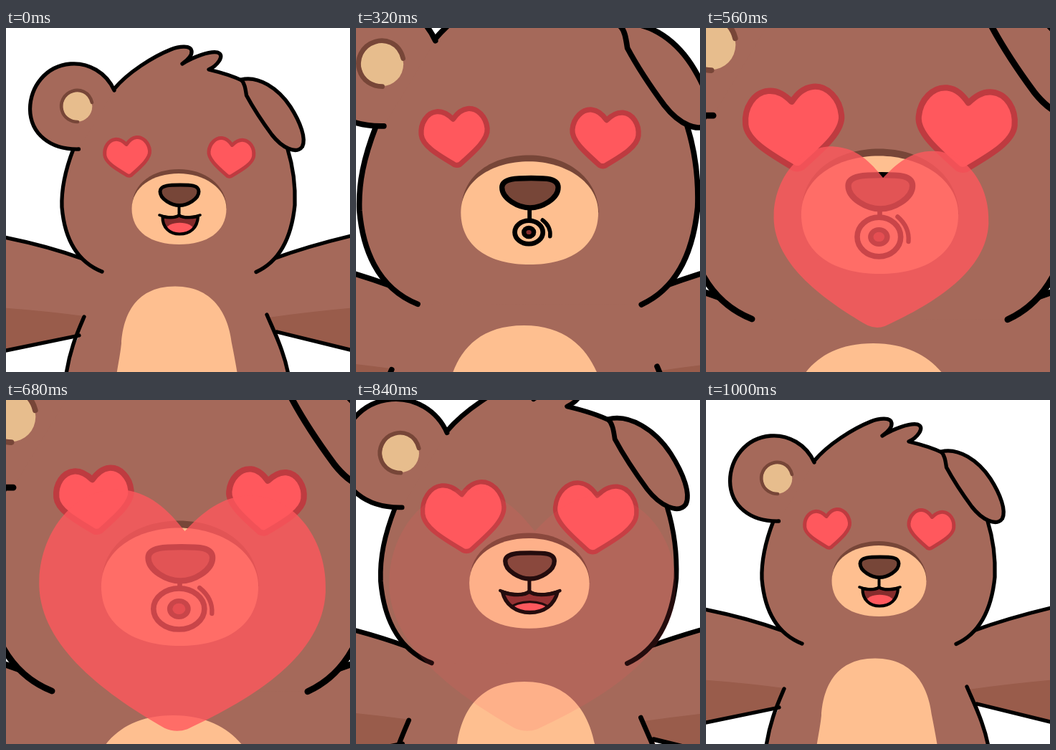
Recreate the animation shown at these times as an HTML page with a canvas. Size 480 px wide and 480 px high, loop 1040 ms.

```html
<!DOCTYPE html>
<html lang="en">
<head>
<meta charset="utf-8">
<title>Bear blowing a kiss</title>
<style>
  html, body { margin: 0; width: 100%; height: 100%; overflow: hidden; background: #fff; }
  canvas { display: block; width: 480px; height: 480px; }
</style>
</head>
<body>
<canvas id="stage" width="480" height="480"></canvas>
<script>
const ctx = document.getElementById('stage').getContext('2d');
const LOOP = 1040, STEP = 40;
const FUR = '#a5695a', SHADE = '#995c4b', DARK = '#774638', PEACH = '#febf90',
      TAN = '#e7bd8d', RED = '#ff585d', RIM = '#be3b40', MAW = '#852c2c', INK = '#000';

const clamp = v => Math.min(1, Math.max(0, v));
const span = (t, a, b) => clamp((t - a) / (b - a));
const smooth = u => u * u * (3 - 2 * u);
const soft = u => u * 0.75 + smooth(u) * 0.25;
const linear = u => u;

// Value at t along [time, value] stops
function track(t, stops, ease = linear) {
  for (let i = 1; i < stops.length; i++) {
    const [a, va] = stops[i - 1], [b, vb] = stops[i];
    if (t <= b) return va + (vb - va) * ease(span(t, a, b));
  }
  return stops[stops.length - 1][1];
}

function shape(path, fill, stroke, width = 5.3) {
  const p = typeof path === 'string' ? new Path2D(path) : path;
  if (fill) { ctx.fillStyle = fill; ctx.fill(p); }
  if (stroke) { ctx.strokeStyle = stroke; ctx.lineWidth = width; ctx.stroke(p); }
}
const line = (path, width) => shape(path, null, INK, width);

function oval(x, y, rx, ry, fill, stroke, width) {
  const p = new Path2D();
  p.ellipse(x, y, rx, ry, 0, 0, Math.PI * 2);
  shape(p, fill, stroke, width);
}

// Unit heart; belly sets how far the lower sides bulge
const heartPath = belly => new Path2D('M0 -.28 C-.06 -.35 -.13 -.415 -.235 -.415 C-.38 -.415 -.5 -.27 -.5 -.09' +
  ` C-.5 ${belly - 0.16} -.27 ${belly} -.04 .409 Q0 .425 .04 .409 C.27 ${belly} .5 ${belly - 0.16} .5 -.09` +
  ' C.5 -.27 .38 -.415 .235 -.415 C.13 -.415 .06 -.35 0 -.28 Z');
const EYE = heartPath(0.24), KISS = heartPath(0.29);

function heart(path, x, y, size, degrees, rim) {
  const m = new DOMMatrix().translate(x, y).rotate(degrees).scale(size);
  const p = new Path2D();
  p.addPath(path, m);
  shape(p, RED, rim && RIM, rim);
}

function body() {
  shape('M-10 290 Q55 302 107 322 L373 322 Q425 303 490 288 V452 L378 424 Q390 455 396 490 H82' +
    ' Q88 455 102 429 L-10 452 Z', FUR);
  shape('M-10 390 Q50 394 109 402 L102 429 L-10 452 Z', SHADE);
  shape('M490 390 Q430 395 366 404 L378 424 L490 452 Z', SHADE);
  line('M-10 290.5 Q55 303 107 322');
  line('M490 288 Q425 303 373 322');
  line('M-10 452 L102 429');
  line('M378 424 L490 451.5');
  line('M109 403 C100 424 88 450 83 490');
  line('M364 400 C375 426 390 455 395 490');
  shape('M153 490 C158 462 160 450 161 440 C163 408 176 360.5 236 360.5 C293 360.5 311 405 315 440' +
    ' C318 455 321 470 324 490 Z', PEACH);
}

function head() {
  const hair = 'M151 85 C170 62 205 40 230 30 C242 25 258 24 259 32 C260 39 253 45 246 50' +
    ' C262 40 284 32 295 34 C307 38 294 53 283 58 C300 62 317 67 331 74';
  const left = 'M94 169 C82 200 77 224 78 250 C81 285 94 324 134 340';
  const right = 'M393 169 C401 195 404 220 403 247 C399 287 385 324 349 340.5';
  shape(hair + ' L393 169 C401 195 404 220 403 247 C399 287 385 324 349 340.5 L134 340' +
    ' C94 324 81 285 78 250 C77 224 82 200 94 169 Z', FUR);
  line(left);
  line(right);
  line(hair);

  shape('M151 87 C140 62 115 48 90 50 C55 53 34 82 33.5 113 C34 148 62 170 101.5 169', FUR, INK);
  oval(99.8, 109.5, 20.5, 21, TAN);
  shape('M120 104 C116 88 102 85 93 88 C80 92 75 105 78 115 C81 126 91 131 100 131', null, DARK, 4.6);

  shape('M328 72 C352 66 380 84 397 110 C411 132 419 154 413.5 165.5 C405 177 385 167 371 149' +
    ' C357 130 343 108 335.5 94 C334 84 333 77 328 72 Z', FUR, INK);
}

function muzzle() {
  shape('M176 250 C176 215 207 197 241 197 C277 197 307 218 308 252 Z', DARK);
  shape('M175.5 252 C175.5 222 205 203 241 203 C276 203 307.5 223 307.5 252' +
    ' C307.5 285 280 302 241.5 302 C203 302 175.5 285 175.5 252 Z', PEACH);
}

function nose() {
  line('M241.5 248 V261', 4);
  shape('M215 228 C215 219 230 219 243 219 C257 219 269 219 269 228 C269 239 253 247.5 242 247.5' +
    ' C231 247.5 215 239 215 228 Z', DARK, INK, 5);
}

function mouth(bowlPath, lips, tongue, tongueLine) {
  const bowl = new Path2D(bowlPath);
  shape(bowl, MAW);
  ctx.save();
  ctx.clip(bowl);
  shape(tongue, RED, tongueLine && INK, tongueLine);
  ctx.restore();
  line(bowl, 4.2);
  line(lips, 3.6);
}

function smile() {
  mouth('M218.5 263 C218 279 229 287.5 242 287.5 C257 287.5 267 279 268 263' +
    ' C258 265 247 265 241.5 261.5 C236 265 227 265 218.5 263 Z',
    'M214 261 C222 264.5 235 265.5 241.5 261 C247 265.5 262 264.5 271 261',
    'M222 283 C224 268 261 268 263 283 V295 H222 Z');
}

function grin() {
  mouth('M212 262 C215 276 227 284.5 242 284.5 C258 284.5 269 276 272.5 262' +
    ' C260 266 247 266 241.5 261.5 C236 266 224 266 212 262 Z',
    'M209.5 260.5 C222 266 235 266 241.5 261.5 C247 266 262 266 275 260.5',
    'M219 281 C227 270 257 270 265 281 V295 H219 Z', 2.6);
}

function pout(t) {
  const rx = track(t, [[240, 12.2], [320, 13.5], [480, 16.2], [680, 21.4], [760, 23]]);
  const ry = track(t, [[240, 9], [320, 11.2], [480, 16], [680, 17.2], [760, 17.5]]);
  const dot = track(t, [[240, 1.5], [320, 2.5], [480, 4.2], [680, 5.4]]);
  const x = 240.8, y = 271;
  oval(x, y, rx, ry, PEACH, INK, 4.6);
  oval(x, y, dot + 4.5, dot * 0.8 + 4.4, INK);
  oval(x, y, dot, dot * 0.85, MAW);
  const ax = x + 6 + rx * 0.53, bx = x + 8 + rx * 0.92;
  line(`M${ax} ${y - ry - 0.5} Q${bx + 1} ${y - ry * 0.5} ${bx} ${y + 4}`, 3.8);
}

function draw(t) {
  const zoom = 1 + 0.66 * (soft(span(t, 0, 480)) - soft(span(t, 680, 955)));
  const pulse = track(t, [[0, 1], [170, 1.26], [340, 1], [490, 1.39], [675, 1], [840, 1.39], [1000, 1]], smooth);

  ctx.setTransform(1, 0, 0, 1, 0, 0);
  ctx.fillStyle = '#fff';
  ctx.fillRect(0, 0, 480, 480);
  ctx.lineCap = ctx.lineJoin = 'round';

  ctx.translate(240, 240);
  ctx.scale(zoom, zoom);
  ctx.translate(-240, -240);
  body();
  head();
  heart(EYE, 169.7, 180, 68 * pulse - 5, -5.5, 5);
  heart(EYE, 313.8, 181, 68 * pulse - 5, 5.5, 5);
  muzzle();
  nose();
  if (t < 240 || t >= 920) smile();
  else if (t < 760) pout(t);
  else grin();

  // The blown kiss keeps its own place while the view pulls back
  const grow = span(t, 395, 615);
  const alpha = 0.79 * (1 - span(t, 680, 875));
  if (grow > 0 && alpha > 0) {
    ctx.setTransform(1, 0, 0, 1, 0, 0);
    ctx.globalAlpha = alpha;
    heart(KISS, 239.5 + 5 * grow, 287 + 8 * grow, 400 * grow, 2.6);
    ctx.globalAlpha = 1;
  }
}

let start;
function tick(now) {
  if (start === undefined) start = now;
  draw(Math.floor(((now - start) % LOOP) / STEP) * STEP);
  requestAnimationFrame(tick);
}
draw(0);
requestAnimationFrame(tick);
</script>
</body>
</html>
```
